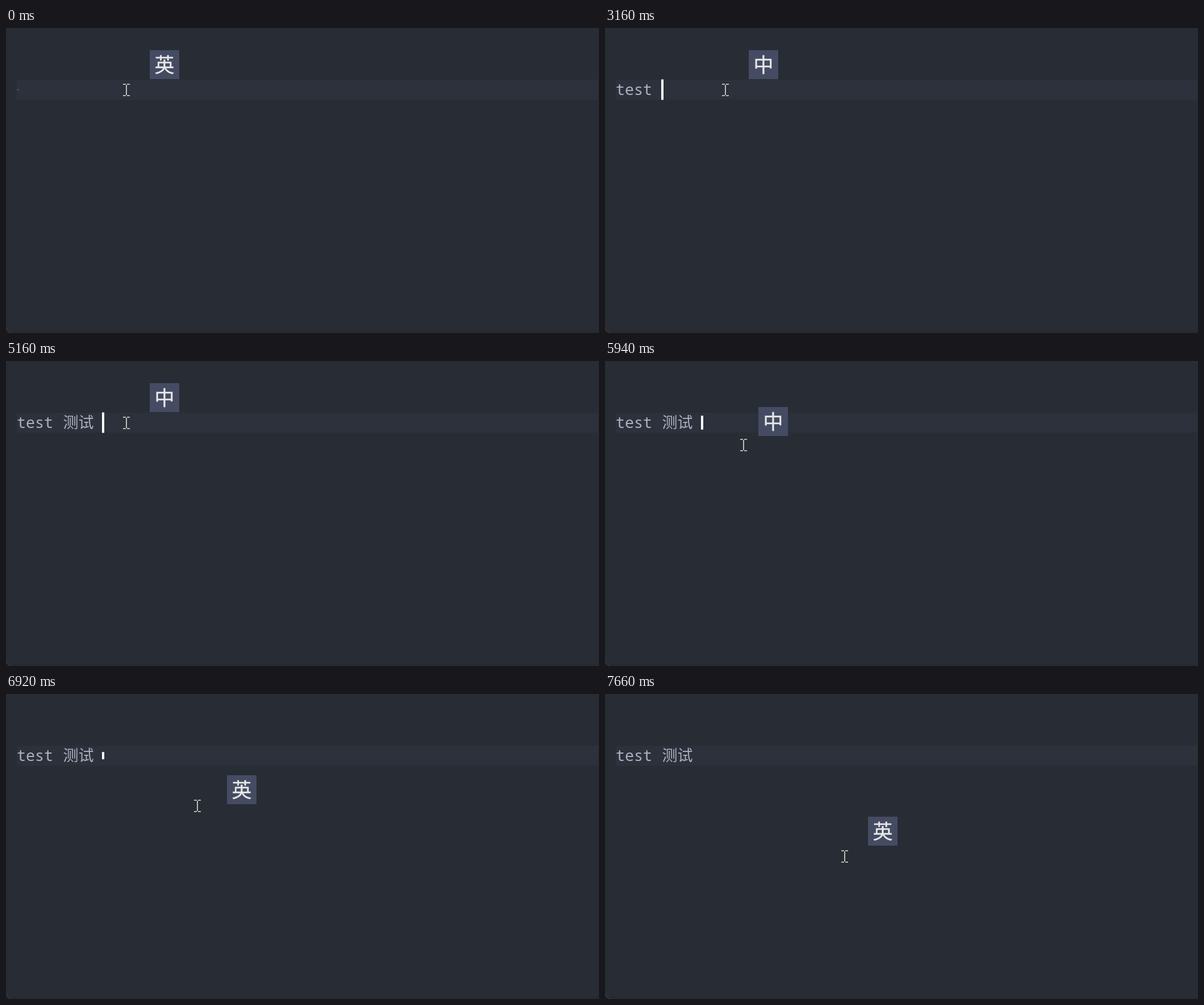
An HTML page for the animation above (8720 ms loop, 1044 by 537 pixels).

```html
<!DOCTYPE html>
<html lang="zh">
<head>
<meta charset="utf-8">
<title>Input method indicator</title>
<style>
  html, body { margin: 0; width: 100%; height: 100%; overflow: hidden; background: #282c34; }
  svg { display: block; width: 100%; height: 100%; }
  text { white-space: pre; fill: #abb0bf; }
  #latin { font: 26.667px "Noto Sans Mono", "DejaVu Sans Mono", monospace; }
  #han { font: 300 27px "Noto Sans CJK SC", "Noto Sans CJK", sans-serif; }
  #mode { font: 35px "Noto Sans CJK SC", "Noto Sans CJK", sans-serif; fill: #e8e8e8; stroke: #e8e8e8; stroke-width: .4; text-anchor: middle; }
</style>
</head>
<body>
<svg viewBox="0 0 1044 537">
  <rect width="1044" height="537" fill="#282c34"/>
  <rect y="533" width="1044" height="4" fill="#262a31"/>
  <path d="M0 527Q1 535 10 537H0Z" fill="#1b1d22"/>
  <path d="M0 527Q1 535 10 537" fill="none" stroke="#4b4547"/>
  <rect x="19" y="91" width="1024" height="35" fill="#2c313c"/>
  <text id="latin" x="19" y="118"></text>
  <text id="han" x="100.5" y="118"></text>
  <rect id="sliver" x="19" y="108" width="4" height="1" fill="#63676e"/>
  <rect id="caret" width="4" fill="#fff"/>
  <g id="badge">
    <rect x="-26" y="-26" width="52" height="51" fill="#454b62"/>
    <text id="mode" y="13"></text>
  </g>
  <path id="mouse" d="M-6 -10H-1M1 -10H6M0 -9V9M-6 10H-1M1 10H6" fill="none" stroke="#e4e2d8" stroke-width="1.6"/>
</svg>
<script>
const LOOP = 8720, STILL = 7660;
const FOCUS = 1450, WANDER = 5200;          // caret appears, pointer starts to roam
const REST = 450, BEAT = 370, FADE = 200;   // caret: solid after a key, half blink, fade
const SLIDE = 50, LAG = 16;

const [latin, han, sliver, caret, badge, mode, mouse] =
  ['latin', 'han', 'sliver', 'caret', 'badge', 'mode', 'mouse'].map(id => document.getElementById(id));

const keys = [
  [FOCUS - BEAT - REST, ''],
  ...[...'test'].map((c, i) => [1960 + 108 * i, c]),
  [2860, ' '], [4480, '测试'], [5040, ' ']
];

// Pointer strokes: start, time per leg, waypoints
const strokes = [
  [5500, 88, [[212, 109], [236, 165], [205, 245], [116, 235], [155, 178], [243, 148],
    [310, 148], [374, 174], [392, 220], [356, 264], [322, 296]]],
  [6470, 60, [[322, 296], [343, 306]]],
  [6825, 75, [[343, 306], [350, 218], [284, 158], [195, 178], [131, 260], [140, 307],
    [181, 345], [270, 361], [355, 347], [410, 322], [431, 297], [422, 286]]]
];

const clamp = v => Math.max(0, Math.min(1, v));
const ease = p => (1 - Math.cos(Math.PI * p)) / 2;
const isHan = c => c > '\u4e00';
const advance = text => [...text].reduce((w, c) => w + (isHan(c) ? 27 : 16), 0);

function pointer(t) {
  const [start, leg, pts] = strokes.findLast(s => s[0] <= t) || strokes[0];
  const last = pts.length - 1;
  const q = Math.max(0, Math.min(last, (t - start) / leg));
  const i = Math.min(Math.floor(q), last - 1), u = q - i, v = 1 - u;
  const slope = (n, k) => n % last ? (pts[n + 1][k] - pts[n - 1][k]) / 2 : 0;
  return [0, 1].map(k => Math.round(
    pts[i][k] * v * v * (1 + 2 * u) + pts[i + 1][k] * u * u * (3 - 2 * u) +
    u * v * (v * slope(i, k) - u * slope(i + 1, k))));
}

function caretScale(t, pressed) {
  if (t < FOCUS) return 0;
  const idle = t - pressed - REST;
  if (idle < 0) return 1;
  const beat = t < WANDER ? BEAT : 328;
  const n = Math.floor(idle / beat), p = ease(clamp((idle - n * beat) / FADE));
  return n % 2 ? p : 1 - p;
}

const move = (node, x, y) => node.setAttribute('transform', `translate(${x} ${y})`);

function draw(t) {
  const typed = keys.filter(k => k[0] <= t);
  const text = typed.map(k => k[1]).join('');
  const [pressed, added] = typed[typed.length - 1] || keys[0];
  latin.textContent = [...text].filter(c => !isHan(c)).join('').trimEnd();
  han.textContent = [...text].filter(isHan).join('');

  const h = 36 * caretScale(t, pressed);
  const left = advance(added) * (1 - clamp((t - pressed) / SLIDE));
  caret.setAttribute('x', 19 + advance(text) - left);
  caret.setAttribute('y', 108.5 - h / 2);
  caret.setAttribute('height', h);
  sliver.setAttribute('visibility', t < 680 ? 'visible' : 'hidden');

  const [bx, by] = pointer(t - LAG);
  move(mouse, ...pointer(t));
  move(badge, bx + 67, by - 44);
  mode.textContent = t >= 3160 && t < 6600 ? '中' : '英';
}

const origin = performance.now();
function tick() {
  draw(Math.min((performance.now() - origin) % LOOP, STILL));
  requestAnimationFrame(tick);
}
tick();
</script>
</body>
</html>
```
